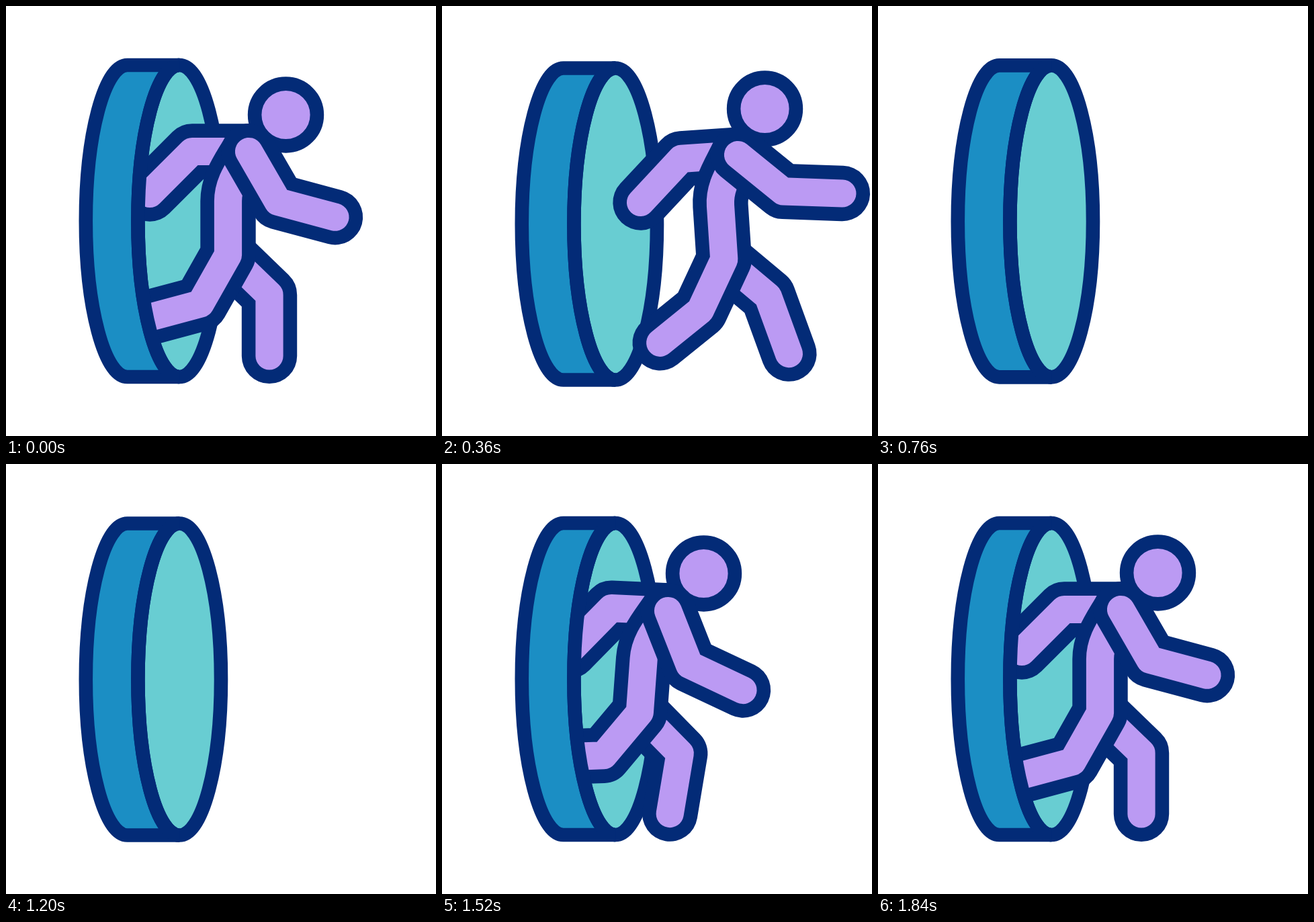
An HTML page with a canvas that plays this animation: 640x640 px, repeating every 2000 ms.

```html
<!DOCTYPE html>
<html lang="en">
<head>
<meta charset="utf-8">
<title>Portal runner</title>
<style>
  html, body { margin: 0; width: 100%; height: 100%; overflow: hidden; background: #fff; }
  canvas { display: block; width: 100vw; height: 100vh; }
</style>
</head>
<body>
<canvas id="stage"></canvas>
<script>
const SIZE = 640, LOOP = 2000, STEP = 40;
const NAVY = '#032b77', BLUE = '#1b8ec4', CYAN = '#68cdd2', SKIN = '#bb9af3';
const LINE = 20.6, THICK = 41.2;
const RAD = Math.PI / 180;

const canvas = document.getElementById('stage');
const ctx = canvas.getContext('2d');
const ratio = window.devicePixelRatio || 1;
canvas.width = canvas.height = SIZE * ratio;
ctx.scale(ratio, ratio);
ctx.lineJoin = 'round';

// Pose: shoulder y, body tilt, head x/y from shoulder, then two angles each
// for back arm, front arm, front leg, back leg (degrees, clockwise from right).
const REST = [216.5, 0, 55, -54.5, 180, 135, 60, 15, 119.5, 165, 44, 90];
const LEAVE = [
  [0, REST],
  [360, [217, -3.8, 40, -68.5, 176, 133, 39, 2, 115, 141, 40, 70]],
  [520, [217.3, -5.2, 37, -69.3, 174.3, 128, 38.5, 0, 114.5, 143, 39, 67]]
];
const ARRIVE = [
  [1200, [219, 4.8, 46, -59, 184, 135, 80, 48, 145, 198, 60, 119]],
  [1360, [219, 4.8, 49, -57.5, 183.5, 135, 75, 38, 138, 190, 54, 110.7]],
  [1520, [218.5, 4.2, 53, -55.5, 182.6, 134.5, 68.5, 25.2, 130, 178, 45.5, 99.5]],
  [1800, REST]
];

const clamp = v => Math.min(1, Math.max(0, v));
const smooth = (a, b, t) => { const u = clamp((t - a) / (b - a)); return u * u * (3 - 2 * u); };
const bump = (mid, half, t) =>
  Math.abs(t - mid) < half ? Math.cos(Math.PI / 2 * (t - mid) / half) ** 2 : 0;

// Monotone cubic through the keys, flat at both ends.
function poseAt(keys, t) {
  const last = keys.length - 1;
  if (t <= keys[0][0]) return keys[0][1];
  if (t >= keys[last][0]) return keys[last][1];
  let i = 0;
  while (t >= keys[i + 1][0]) i++;
  const span = keys[i + 1][0] - keys[i][0];
  const u = (t - keys[i][0]) / span;
  const rise = (k, n) => (keys[k + 1][1][n] - keys[k][1][n]) / (keys[k + 1][0] - keys[k][0]);
  const slope = (k, n) => {
    if (k === 0 || k === last) return 0;
    const a = rise(k - 1, n), b = rise(k, n);
    return a * b > 0 ? 2 * a * b / (a + b) : 0;
  };
  return keys[i][1].map((p, n) => {
    const q = keys[i + 1][1][n];
    const h = u * u * (3 - 2 * u);
    return p + (q - p) * h
      + span * (slope(i, n) * u * (1 - u) ** 2 - slope(i + 1, n) * u * u * (1 - u));
  });
}

function shoulderX(t) {
  if (t < 900) return 361.5 + 281 * (t / 520) ** 3.45;
  return 361.5 - 25 * (Math.max(0, 1820 - t) / 300) ** 4.15;
}

const lift = t => 7.5 * bump(290, 160, t) + 9.5 * bump(1355, 165, t)
  + 0.4 * smooth(600, 760, t) * (1 - smooth(1200, 1400, t));

const move = ([x, y], angle, len) =>
  [x + len * Math.cos(angle * RAD), y + len * Math.sin(angle * RAD)];

function tube(path) {
  ctx.lineCap = 'round';
  for (const [color, width] of [[NAVY, THICK + 2 * LINE], [SKIN, THICK]]) {
    ctx.strokeStyle = color;
    ctx.lineWidth = width;
    ctx.stroke(path);
  }
}

function limb(from, a1, len1, a2, len2) {
  const joint = move(from, a1, len1);
  const path = new Path2D();
  path.moveTo(...from);
  path.lineTo(...joint);
  path.lineTo(...move(joint, a2, len2));
  tube(path);
}

function runner(t) {
  const [y, tilt, hx, hy, ba1, ba2, fa1, fa2, fl1, fl2, bl1, bl2] =
    poseAt(t < 900 ? LEAVE : ARRIVE, t);
  const neck = [shoulderX(t), y];
  const c = Math.cos(tilt * RAD), s = Math.sin(tilt * RAD);
  const at = (x, y) => [neck[0] + x * c - y * s, neck[1] + x * s + y * c];
  const hip = at(-31, 154);

  limb(neck, ba1, 84.5, ba2, 89);
  limb(hip, bl1, 85.5, bl2, 91);

  const knee = move(hip, fl1, 83.5);
  const body = new Path2D();
  body.moveTo(...neck);
  body.bezierCurveTo(...at(-15, 26), ...at(-31, 46), ...at(-31, 74));
  body.lineTo(...hip);
  body.lineTo(...knee);
  body.lineTo(...move(knee, fl2, 77));
  tube(body);

  ctx.beginPath();
  ctx.arc(neck[0] + hx, neck[1] + hy, 46.4, 0, 2 * Math.PI);
  ctx.fillStyle = SKIN;
  ctx.fill();
  ctx.strokeStyle = NAVY;
  ctx.lineWidth = LINE;
  ctx.stroke();

  limb(neck, fa1, 86.5, fa2, 88.2);
}

const RIM = { x: 258.2, y: 320, rx: 61.8, ry: 232 };
const leftArc = (path, x) =>
  path.ellipse(x, RIM.y, RIM.rx, RIM.ry, 0, 1.5 * Math.PI, 0.5 * Math.PI, true);

function outline(path, fill) {
  ctx.lineCap = 'butt';
  ctx.fillStyle = fill;
  ctx.fill(path);
  ctx.strokeStyle = NAVY;
  ctx.lineWidth = LINE;
  ctx.stroke(path);
}

const side = new Path2D();
side.moveTo(RIM.x, RIM.y - RIM.ry);
leftArc(side, 180.6);
side.lineTo(RIM.x, RIM.y + RIM.ry);

const disc = new Path2D();
disc.ellipse(RIM.x, RIM.y, RIM.rx, RIM.ry, 0, 0, 2 * Math.PI);

const edge = new Path2D();
leftArc(edge, RIM.x);

// Everything to the right of the near rim.
const opening = new Path2D();
opening.moveTo(RIM.x, -50);
leftArc(opening, RIM.x);
opening.lineTo(RIM.x, 700);
opening.lineTo(700, 700);
opening.lineTo(700, -50);
opening.closePath();

function draw(t) {
  ctx.fillStyle = '#fff';
  ctx.fillRect(0, 0, SIZE, SIZE);
  ctx.save();
  ctx.translate(0, lift(t));
  outline(side, BLUE);
  outline(disc, CYAN);

  ctx.save();
  ctx.clip(opening);
  runner(t);
  ctx.restore();

  ctx.lineCap = 'butt';
  ctx.strokeStyle = NAVY;
  ctx.lineWidth = LINE;
  ctx.stroke(edge);
  ctx.restore();
}

const start = performance.now();
function tick() {
  const t = (performance.now() - start) % LOOP;
  draw(Math.floor(t / STEP) * STEP);
  requestAnimationFrame(tick);
}
tick();
</script>
</body>
</html>
```
